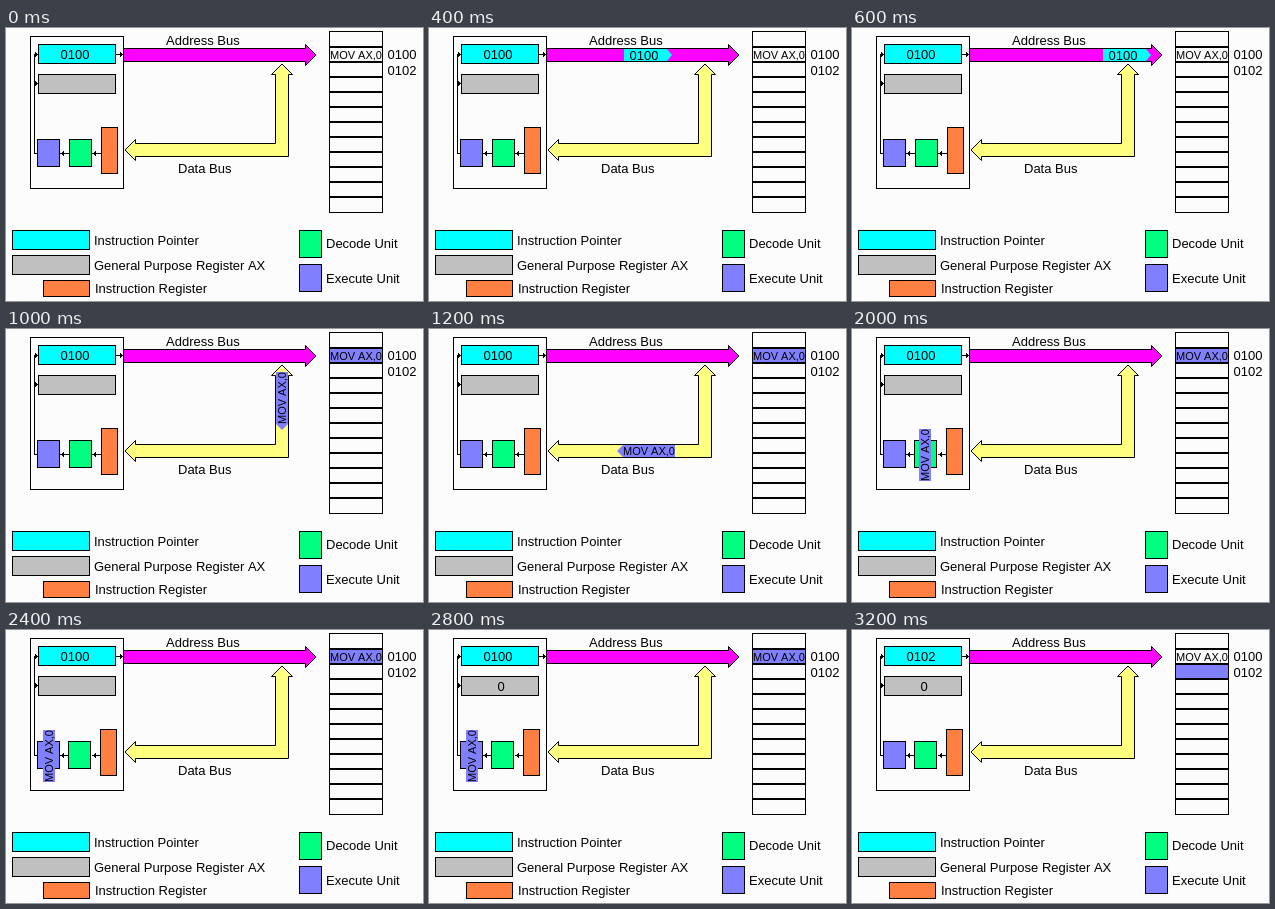
Recreate the animation shown at these times as an HTML page with a canvas. Size 417 by 273 pixels, loop 4200 ms.

```html
<!DOCTYPE html>
<html>
<head>
<meta charset="utf-8">
<title>Fetch, decode, execute</title>
<style>
  html, body { margin: 0; width: 100%; height: 100%; overflow: hidden; background: #fcfcfc; }
  canvas { display: block; }
</style>
</head>
<body>
<canvas id="stage" width="417" height="273"></canvas>
<script>
const c = document.getElementById('stage').getContext('2d');
const PAPER = '#fcfcfc', INK = '#000', CYAN = '#00ffff', GRAY = '#c0c0c0',
      ORANGE = '#ff8040', GREEN = '#00ff80', BLUE = '#8080ff', PINK = '#ff00ff',
      YELLOW = '#ffff80';
const OPCODE = 'MOV AX,0', LOOP = 4200;

function fill(x, y, w, h, color) {
  c.fillStyle = color;
  c.fillRect(x, y, w, h);
}

// Outlined rectangle; the edges are the pixel columns and rows of the border.
function box(x1, y1, x2, y2, color) {
  fill(x1, y1, x2 - x1 + 1, y2 - y1 + 1, INK);
  fill(x1 + 1, y1 + 1, x2 - x1 - 1, y2 - y1 - 1, color);
}

function text(s, x, y, size = 13) {
  c.font = size + 'px "Liberation Sans", Arial, sans-serif';
  c.fillStyle = INK;
  c.fillText(s, x, y);
}

function poly(points, color, outlined) {
  c.beginPath();
  points.forEach(([x, y]) => c.lineTo(x, y));
  c.closePath();
  c.fillStyle = color;
  c.fill();
  if (outlined) {
    c.strokeStyle = INK;
    c.lineWidth = 1;
    c.stroke();
  }
}

// Horizontal line from x1 to x2 with a small stepped arrowhead at x2
function wire(x1, x2, y) {
  const step = Math.sign(x2 - x1);
  fill(Math.min(x1, x2), y, Math.abs(x2 - x1) + 1, 1, INK);
  for (let i = 0; i < 3; i++) fill(x2 - step * (i + 1), y - i, 1, 2 * i + 1, INK);
}

function addressChip(x) {
  poly([[x, 21], [x + 43, 21], [x + 48, 27], [x + 43, 33], [x, 33]], CYAN);
  text('0100', x + 5.5, 32);
}

// Instruction travelling on the data bus, pointed at its leading end
function opcodeChip(x, y, angle = 0) {
  c.save();
  c.translate(x, y);
  c.rotate(angle);
  poly([[0, 6], [6, 0], [58, 0], [58, 12], [6, 12]], BLUE);
  text(OPCODE, 6, 10, 11);
  c.restore();
}

// Instruction standing upright inside a unit
function heldOpcode(x, bottom) {
  fill(x, bottom - 52, 12, 52, BLUE);
  c.save();
  c.translate(x, bottom);
  c.rotate(-Math.PI / 2);
  text(OPCODE, 0, 10, 11);
  c.restore();
}

function legend() {
  box(6, 202, 83, 221, CYAN);
  box(6, 227, 83, 246, GRAY);
  box(37, 252, 83, 268, ORANGE);
  box(293, 202, 315, 229, GREEN);
  box(293, 236, 315, 263, BLUE);
  text('Instruction Pointer', 88, 217);
  text('General Purpose Register AX', 88, 242);
  text('Instruction Register', 89, 265);
  text('Decode Unit', 320, 220);
  text('Execute Unit', 320, 255);
}

function processor(t) {
  const shift = t < 2000 ? 0 : 1; // units settle a pixel left once decoding starts
  box(24, 8, 117, 160, PAPER);
  box(32, 16, 109, 35, CYAN);
  box(32, 46, 109, 65, GRAY);
  box(95 - shift, 99, 111 - shift, 145, ORANGE);
  box(63 - shift, 111, 85 - shift, 138, GREEN);
  box(31, 111, 53, 138, BLUE);
  fill(28, 26, 1, 100, INK);
  fill(28, 125, 3, 1, INK);
  wire(28, 32, 26);
  wire(28, 32, 55);
  wire(110, 117, 26);
  wire(94, 86, 125);
  wire(62, 54, 125);
  text(t < 3200 ? '0100' : '0102', 54.5, 31);
  if (t >= 2800) text('0', 68.5, 61);
}

function buses() {
  poly([[117.5, 20.5], [299.5, 20.5], [299.5, 16.5], [310, 27], [299.5, 37.5],
        [299.5, 33.5], [117.5, 33.5]], PINK, true);
  poly([[119, 122], [129.5, 111.5], [129.5, 115.5], [269.5, 115.5], [269.5, 46.5],
        [265.5, 46.5], [276, 36], [286.5, 46.5], [282.5, 46.5], [282.5, 128.5],
        [129.5, 128.5], [129.5, 132.5]], YELLOW, true);
  text('Address Bus', 160, 17);
  text('Data Bus', 172, 145);
}

function memory(t) {
  box(323, 3, 376, 184, PAPER);
  for (let y = 18; y < 183; y += 15) fill(323, y, 54, 2, INK);
  if (t >= 800) fill(324, t < 3200 ? 20 : 35, 52, 13, BLUE);
  text(OPCODE, 324, 31, 11);
  text('0100', 381.5, 31);
  text('0102', 381.5, 47);
}

function travel(t) {
  if (t < 200) return;
  if (t < 800) addressChip([126, 195, 251][Math.floor(t / 200) - 1]);
  else if (t < 1000) return;
  else if (t < 1200) opcodeChip(270, 101, -Math.PI / 2);
  else if (t < 1400) opcodeChip(188, 116);
  else if (t < 1600) opcodeChip(127, 116);
  else if (t < 2000) heldOpcode(98, 148);
  else if (t < 2400) heldOpcode(67, 152);
  else if (t < 3200) heldOpcode(37, 152);
}

const start = performance.now();
function draw() {
  const t = (performance.now() - start) % LOOP;
  fill(0, 0, 417, 273, PAPER);
  legend();
  processor(t);
  buses();
  memory(t);
  travel(t);
  requestAnimationFrame(draw);
}
draw();
</script>
</body>
</html>
```
